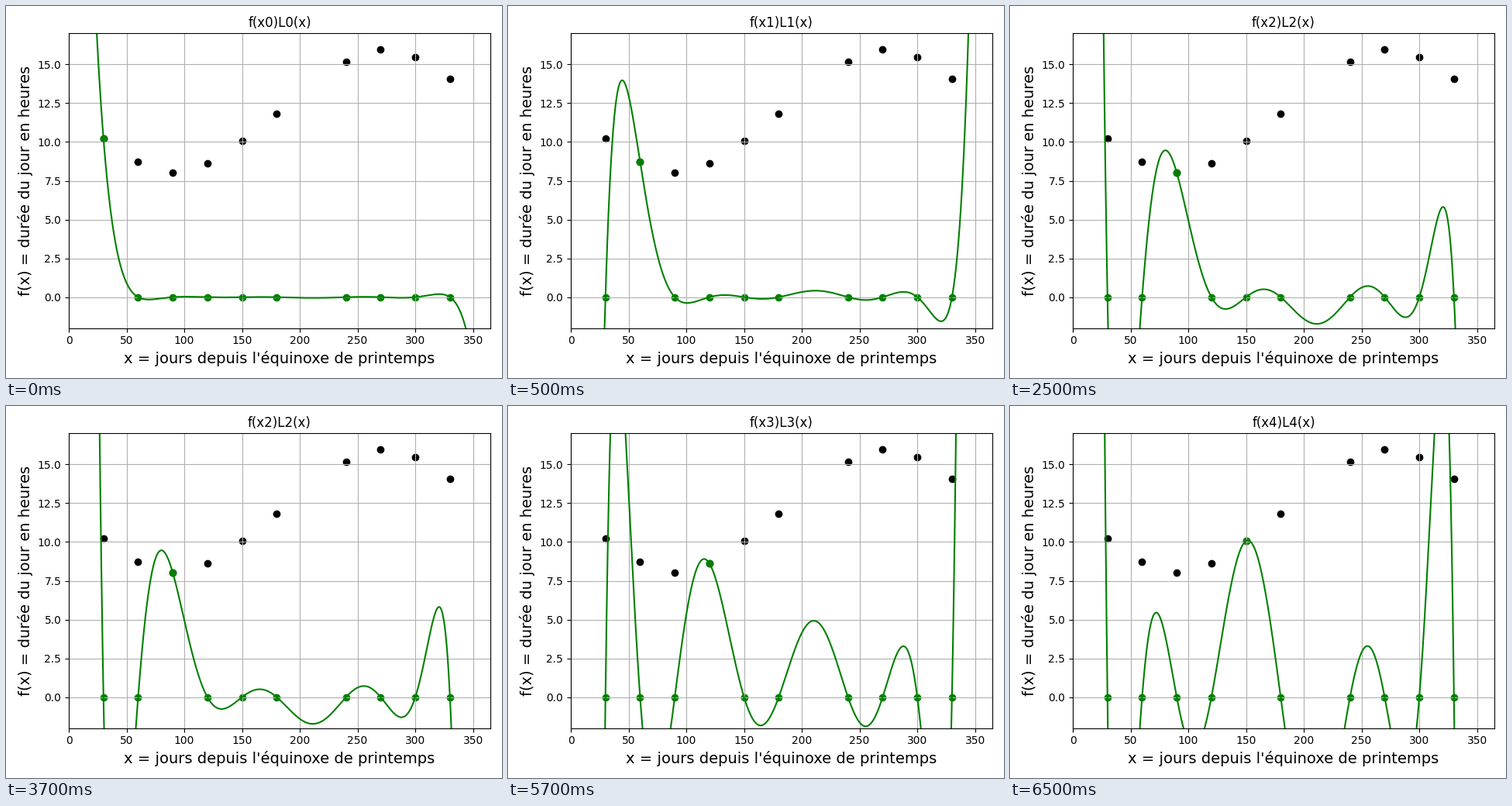
These frames come from a looping animation (640x480 px, 8 s). A matplotlib script:

```python
import numpy as np
import matplotlib.pyplot as plt
from matplotlib.animation import FuncAnimation

DAYS = np.array([30, 60, 90, 120, 150, 180, 240, 270, 300, 330])
HOURS = np.array([10.22, 8.72, 8.02, 8.62, 10.07, 11.82, 15.15, 15.95, 15.45, 14.05])
WIDTH, HEIGHT, DPI = 640, 480, 100
STEP_MS = 500
FRAMES = 16

x = np.linspace(0, 365, 1461)


def lagrange_term(k):
    """Lagrange basis polynomial k, scaled by the value at its node."""
    others = np.delete(DAYS, k)
    factors = (x[:, None] - others) / (DAYS[k] - others)
    return HOURS[k] * factors.prod(axis=1)


fig, ax = plt.subplots(figsize=(WIDTH / DPI, HEIGHT / DPI), dpi=DPI)
ax.scatter(DAYS, HOURS, color="black")
nodes = ax.scatter(DAYS, np.zeros(len(DAYS)), color="green")
curve, = ax.plot([], [], color="green")
ax.set_xlim(0, 365)
ax.set_ylim(-2, 17)
ax.grid()
ax.set_xlabel("x = jours depuis l'équinoxe de printemps", fontsize=14)
ax.set_ylabel("f(x) = durée du jour en heures", fontsize=14)
title = ax.set_title("f(x0)L0(x)")
fig.tight_layout()
# Pin the two margins that depend on font metrics.
fig.subplots_adjust(left=81.04 / WIDTH, top=1 - 35.33 / HEIGHT)


def update(frame):
    # The first term shows for one step, each later one for four.
    k = (frame + 3) // 4
    curve.set_data(x, lagrange_term(k))
    values = np.where(np.arange(len(DAYS)) == k, HOURS, 0)
    nodes.set_offsets(np.column_stack([DAYS, values]))
    title.set_text(f"f(x{k})L{k}(x)")
    return curve, nodes, title


anim = FuncAnimation(fig, update, frames=FRAMES, interval=STEP_MS,
                     init_func=lambda: update(0), repeat=True, repeat_delay=0)
plt.show()
```
